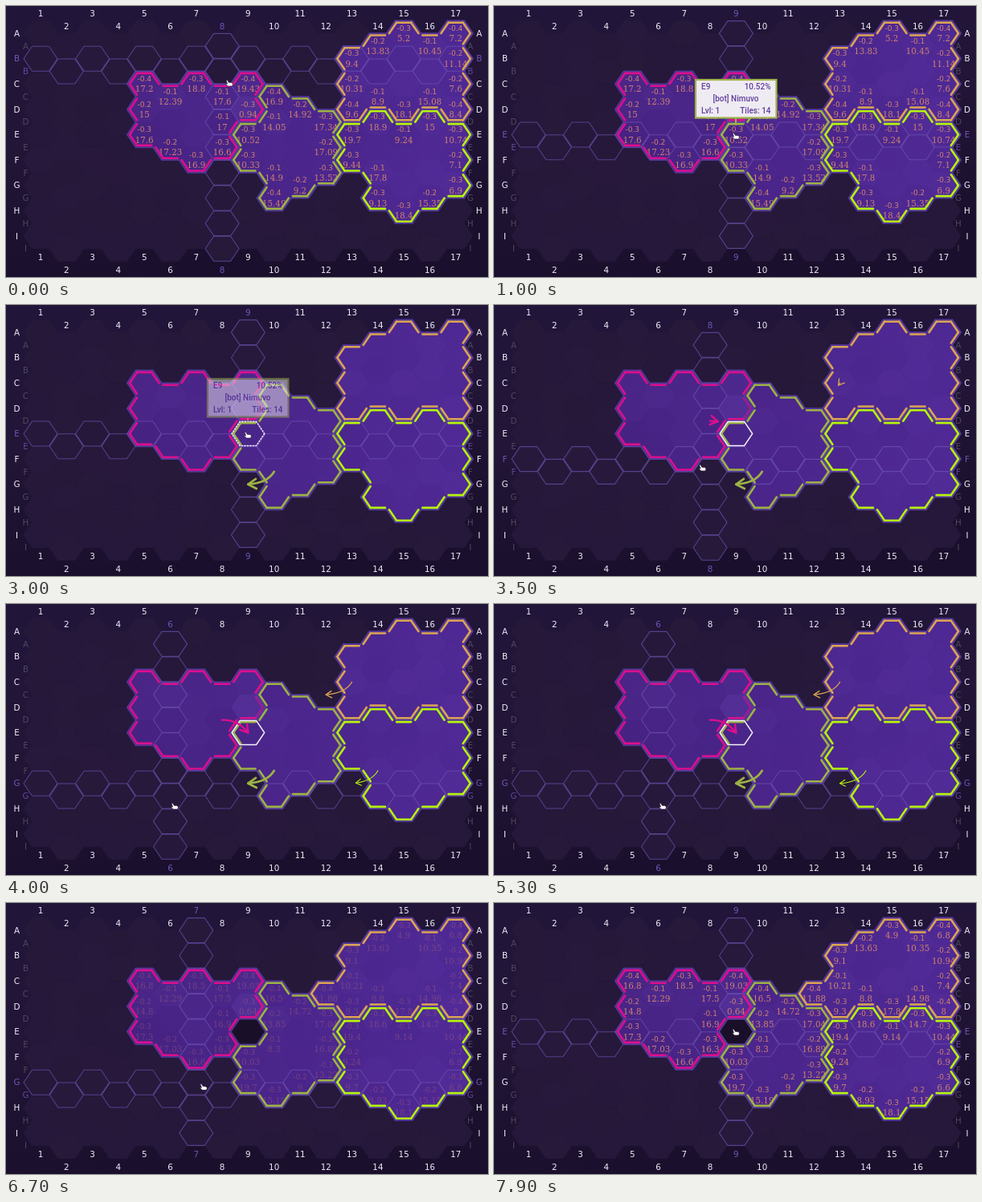
Recreate the animation shown at these times as an HTML page. Size 600 by 338 pixels, loop 8 s.

```html
<!DOCTYPE html>
<html lang="en">
<head>
<meta charset="utf-8">
<title>Hex territories</title>
<style>
html, body { margin: 0; width: 100%; height: 100%; overflow: hidden; background: #170d29; }
svg { display: block; width: 600px; height: 338px; }
text { text-anchor: middle; }
.label { font: 10.4px "DejaVu Sans", sans-serif; }
.delta { font: 9px "DejaVu Sans", sans-serif; }
.value { font: 10.3px "DejaVu Serif", serif; }
.tip { font: 500 10px Roboto, sans-serif; fill: #603f9c; }
.start { text-anchor: start; }
.end { text-anchor: end; }
</style>
</head>
<body>
<svg viewBox="0 0 600 338">
  <defs>
    <linearGradient id="sky" x1="0" y1="0" x2=".25" y2="1">
      <stop offset="0" stop-color="#21153a"/><stop offset=".5" stop-color="#221537"/><stop offset="1" stop-color="#1a0f2c"/>
    </linearGradient>
    <linearGradient id="land" gradientUnits="userSpaceOnUse" x1="150" y1="0" x2="580" y2="0">
      <stop offset="0" stop-color="#462282"/><stop offset="1" stop-color="#4e2894"/>
    </linearGradient>
  </defs>
  <rect width="600" height="338" fill="url(#sky)"/>
  <g id="board"></g>
  <g id="scene"></g>
</svg>
<script>
const LOOP = 8000, STEP = 100;
const DX = 32.3, DY = 31.6, R = 21.4, H = 15.8, INSET = .85;
const ROWS = 'ABCDEFGHI', COLS = 17;

const clamp = v => Math.max(0, Math.min(1, v));
const ramp = (t, a, b) => clamp((t - a) / (b - a));
const ease = p => p * p * (3 - 2 * p);
const during = (t, a, b) => t >= a && t < b;

const key = (col, row) => ROWS[row] + col;
const parse = id => [+id.slice(1), ROWS.indexOf(id[0])];
const center = id => {
  const [col, row] = parse(id);
  return [43 + (col - 1) * DX, (col % 2 ? 34.1 : 49.9) + row * DY];
};
const corner = (id, i, k = 1) => {
  const [x, y] = center(id);
  const sx = [1, .5, -.5, -1, -.5, .5][i % 6], sy = [0, 1, 1, 0, -1, -1][i % 6];
  return (x + sx * R * k).toFixed(1) + ' ' + (y + sy * H * k).toFixed(1);
};
const hex = (id, k = 1) => 'M' + [0, 1, 2, 3, 4, 5].map(i => corner(id, i, k)).join('L') + 'Z';
const edge = (id, i, k) => 'M' + corner(id, i, k) + 'L' + corner(id, i + 1, k);

// Neighbours in edge order: SE, S, SW, NW, N, NE
function neighbours(id) {
  const [c, r] = parse(id), up = c % 2 ? r - 1 : r;
  return [[c + 1, up + 1], [c, r + 1], [c - 1, up + 1], [c - 1, up], [c, r - 1], [c + 1, up]]
    .map(([col, row]) => key(col, row));
}

const cells = [];
for (let r = 0; r < 9; r++) for (let c = 1; c <= COLS; c++) cells.push(key(c, r));

let seed = 11;
const rand = () => (seed = seed * 16807 % 2147483647) / 2147483647;
const tint = {};
cells.forEach(id => tint[id] = rand() ** 2 * .045);
tint.D9 = .11;
tint.C6 = .06;

const span = text => text.split(' ').flatMap(part => {
  const [from, to] = part.slice(1).split('-').map(Number), list = [];
  for (let c = from; c <= (to || from); c++) list.push(part[0] + c);
  return list;
});
const lands = [
  { color: '#dc0f8c', cells: span('C5-9 D5-9 E5-8 F7') },
  { color: '#9db345', cells: span('C10 D10-12 E9-12 F9-12 G10-11') },
  { color: '#dca552', cells: span('A14-17 B13-17 C13-17 D13 D15 D17') },
  { color: '#b5f50c', cells: span('D14 D16 E13-17 F13-17 G14-17 H15') }
];
const [PINK, OLIVE, GOLD, LIME] = lands.map(l => l.color);

// Cell, strength, loss per turn (tenths)
const readStats = text => Object.fromEntries(text.split(',').map(s => {
  const [id, value, loss] = s.trim().split(' ');
  return [id, [+value, +loss]];
}));
const first = readStats(`C5 17.2 4,C6 12.39 1,C7 18.8 3,C8 17.6 1,C9 19.43 4,D5 15 2,D8 17 1,D9 .94 3,
  E5 17.6 3,E6 17.23 2,E8 16.6 3,F7 16.9 3,
  E9 10.52 3,F9 10.33 3,C10 16.9 4,D10 14.05 1,F10 14.9 1,G10 15.49 4,D11 14.92 2,G11 9.2 2,
  D12 17.34 3,E12 17.09 2,F12 13.52 3,
  A14 13.83 2,A15 5.2 3,A16 10.45 1,A17 7.2 4,B13 9.4 3,B17 11.14 2,C13 10.31 2,C14 8.9 1,
  C16 15.08 1,C17 7.6 2,D13 9.6 4,D15 18.1 3,D17 8.4 4,
  D14 18.9 3,D16 15 3,E13 19.7 3,E15 9.24 1,E17 10.74 3,F13 9.44 3,F14 17.8 1,F17 7.1 2,
  G14 9.13 3,G16 15.35 2,G17 6.9 3,H15 18.4 3`);
const second = { ...first, ...readStats(`D10 14.05 2,E10 8.4 1,G9 20 3,G10 15.49 3,C12 12.28 4,C13 10.31 1,
  D13 9.6 3,F13 9.44 2,G13 10 3,G14 9.13 2`) };
['E9', 'F10', 'F14'].forEach(id => delete second[id]);
for (const id in second) second[id] = [second[id][0] - second[id][1] / 10, second[id][1]];

const arrows = [
  { from: 'F10', to: 'G9', color: OLIVE, width: 2.8, start: 2300, end: 2900 },
  { from: 'D8', to: 'E9', color: PINK, width: 2.4, start: 3300, end: 3900 },
  { from: 'C13', to: 'C12', color: GOLD, width: 1.3, start: 3400, end: 3900 },
  { from: 'F14', to: 'G13', color: LIME, width: 1.1, start: 3600, end: 4100 }
];
const results = [
  ['E9', '-10.52', '0', '#cc7d70', 5500], ['G9', '+20', '20', '#a89c70', 5600],
  ['C12', '+12.28', '12.28', '#bb9f7c', 5600], ['G13', '+10', '10', '#a89c70', 5800]
];
const track = [
  [0, 278, 96], [900, 301, 162], [3100, 301, 162], [3950, 210, 252], [5500, 210, 252],
  [6100, 229, 245], [6400, 229, 245], [7100, 272, 205], [7600, 272, 205], [7900, 301, 161]
];

const path = (d, attrs) => `<path d="${d}" ${attrs}/>`;
const line = (d, color, width, extra = '') =>
  path(d, `fill="none" stroke="${color}" stroke-width="${width}" stroke-linecap="round" stroke-linejoin="round" ${extra}`);
const text = (x, y, str, cls, attrs = '') => `<text x="${x}" y="${y}" class="${cls}" ${attrs}>${str}</text>`;

function pointer(t) {
  let i = 1;
  while (i < track.length - 1 && t > track[i][0]) i++;
  const [a, b] = [track[i - 1], track[i]], p = ease(ramp(t, a[0], b[0]));
  return [1, 2].map(n => a[n] + (b[n] - a[n]) * p);
}

function hovered(x, y) {
  const dist = id => { const [cx, cy] = center(id); return Math.hypot(cx - x, cy - y); };
  return cells.reduce((best, id) => dist(id) < dist(best) ? id : best);
}

function ownersAt(t) {
  const own = {};
  lands.forEach((land, i) => land.cells.forEach(id => own[id] = i));
  if (t >= 5500) delete own.E9;
  if (t >= 5600) { own.C12 = 2; own.G9 = 1; }
  if (t >= 6200) own.G13 = 3;
  return own;
}

function drawLabels(col, row) {
  let out = '';
  for (let c = 1; c <= COLS; c++) {
    const fill = `fill="${c === col ? '#7056b5' : '#eee9f5'}"`, odd = c % 2, x = 43 + (c - 1) * DX;
    out += text(x, odd ? 12.8 : 28.6, c, 'label', fill) + text(x, odd ? 317.4 : 333, c, 'label', fill);
  }
  for (let r = 0; r < 9; r++) {
    const on = r === row, y = 37.8 + r * DY;
    const bright = `fill="${on ? '#7056b5' : '#eee9f5'}"`, dim = `fill="${on ? '#5f489b' : '#51465d'}"`;
    out += text(13.5, y, ROWS[r], 'label', bright) + text(24.5, y + H, ROWS[r], 'label', dim);
    out += text(589, y, ROWS[r], 'label', bright) + text(578, y + H, ROWS[r], 'label', dim);
  }
  return out;
}

function drawPair(id, change, value) {
  const [x, y] = center(id);
  return text(x, y - 3.3, change, 'delta') + text(x, y + 10, value, 'value');
}

function drawStats(stats, alpha) {
  if (alpha <= 0) return '';
  const pairs = Object.entries(stats).map(([id, [value, loss]]) =>
    drawPair(id, (-loss / 10).toFixed(1), +value.toFixed(2)));
  return `<g fill="#ce8370" opacity="${alpha.toFixed(2)}">${pairs.join('')}</g>`;
}

function drawResults(t) {
  return results.map(([id, change, value, fill, start]) => {
    const alpha = ramp(t, start, start + 300) * (1 - ramp(t, 6300, 6600));
    return alpha ? `<g fill="${fill}" opacity="${alpha}">${drawPair(id, change, value)}</g>` : '';
  }).join('');
}

function drawLand(own, t) {
  const filled = Object.keys(own);
  if (during(t, 5800, 6200)) filled.push('G13');
  return path(filled.map(id => hex(id)).join(''), 'fill="url(#land)" stroke="url(#land)" stroke-width=".8"') +
    filled.map(id => path(hex(id), `fill="#9d7cff" fill-opacity="${tint[id].toFixed(3)}"`)).join('') +
    (t >= 5500 ? path(hex('E9'), 'fill="#1a0f28"') : '');
}

function drawBorders(own, t) {
  let outer = '', out = '';
  for (const id in own) {
    neighbours(id).forEach((next, i) => {
      if (own[next] === own[id]) return;
      outer += edge(id, i, 1);
      const dotted = id === 'D9' && (i === 0 || i === 5) && during(t, 2800, 6400);
      out += line(edge(id, i, INSET), lands[own[id]].color, 2.6,
        dotted ? 'style="stroke-linecap:butt" stroke-dasharray="1.5 1.3"' : '');
    });
  }
  return line(outer, '#5b40a5', 1.8, 'opacity=".7"') + out;
}

function drawArrow({ from, to, color, width, start, end }, t) {
  const p = ease(ramp(t, start, end));
  if (!p || t >= 5500) return '';
  const [ax, ay] = center(from), [bx, by] = center(to);
  const dx = bx - ax, dy = by - ay;
  const cx = (ax + bx) / 2 + dy * .35 - dx * .08, cy = (ay + by) / 2 - dx * .23 - dy * .08;
  const mix = (a, b) => a + (b - a) * p;
  const qx = mix(ax, cx), qy = mix(ay, cy);
  const ex = mix(qx, mix(cx, bx)), ey = mix(qy, mix(cy, by));
  const dir = Math.atan2(mix(cy, by) - qy, mix(cx, bx) - qx), len = 5 + width * 2.4;
  const arm = turn => `${ex - len * Math.cos(dir + turn)} ${ey - len * Math.sin(dir + turn)}`;
  return line(`M${ax} ${ay}Q${qx} ${qy} ${ex} ${ey}`, color, width) +
    line(`M${arm(.55)}L${ex} ${ey}L${arm(-.55)}`, color, width);
}

function drawTip(t) {
  const alpha = t < 1000 ? 0 : 1 - ramp(t, 2700, 3300);
  if (!alpha) return '';
  return `<g opacity="${alpha}">` + line('M301 140V148', OLIVE, 2) +
    `<rect x="251" y="92" width="100.5" height="47.5" fill="#efebf2" stroke="#a0b34a" stroke-width="2.2"/>` +
    text(258, 103.5, 'E9', 'tip start') + text(344.5, 103.5, '10.52%', 'tip end') +
    text(301, 119, '[bot] Nimuvo', 'tip') +
    text(258, 134, 'Lvl: 1', 'tip start') + text(344.5, 134, 'Tiles: 14', 'tip end') + '</g>';
}

function drawHand(x, y) {
  return path('M-4 -3Q-3 -4.5 -2 -3L-.8 -.8L2.8 -.4Q4.6 0 4.4 2L3.6 4H-1.6L-4.2 1.6Q-4 .4 -2.4 1Z',
    `transform="translate(${x.toFixed(1)} ${y.toFixed(1)})" fill="#fff" stroke="#20142c" stroke-width=".7"`);
}

function render(t) {
  const [x, y] = pointer(t), [col, row] = parse(hovered(x - 2, y - 3));
  const own = ownersAt(t);
  const cross = cells.filter(id => { const [c, r] = parse(id); return c === col || r === row; });
  let out = drawLand(own, t) +
    line(cross.map(id => hex(id, .98)).join(''), '#7256b8', 1.1, 'opacity=".65"') +
    drawStats(first, 1 - ramp(t, 1000, 1800)) + drawStats(second, ramp(t, 6500, 7200)) +
    drawBorders(own, t);
  if (during(t, 6000, 6200)) {
    out += line(edge('G13', 0, INSET) + edge('G13', 1, INSET), '#92a83c', 2);
    out += line('M474 200L478 205', '#8f9070', 2);
  }
  if (during(t, 2700, 5500)) {
    out += line(hex('E9', .95), '#f4effa', 1.4, t < 3300 ? 'stroke-dasharray="1.5 2"' : '');
  }
  out += arrows.map(a => drawArrow(a, t)).join('') + drawResults(t);
  out += drawLabels(col, row) + drawTip(t) + drawHand(x, y);
  document.getElementById('scene').innerHTML = out;
}

document.getElementById('board').innerHTML =
  path(cells.map(id => hex(id)).join(''), 'fill="#251839" stroke="#251839" stroke-width=".8"') +
  cells.map(id => path(hex(id), `fill="#6a4a90" fill-opacity="${(tint[id] * .8).toFixed(3)}"`)).join('');

let shown = -1;
function tick() {
  const t = Math.floor(performance.now() % LOOP / STEP) * STEP;
  if (t !== shown) render(shown = t);
  requestAnimationFrame(tick);
}
tick();
</script>
</body>
</html>
```
